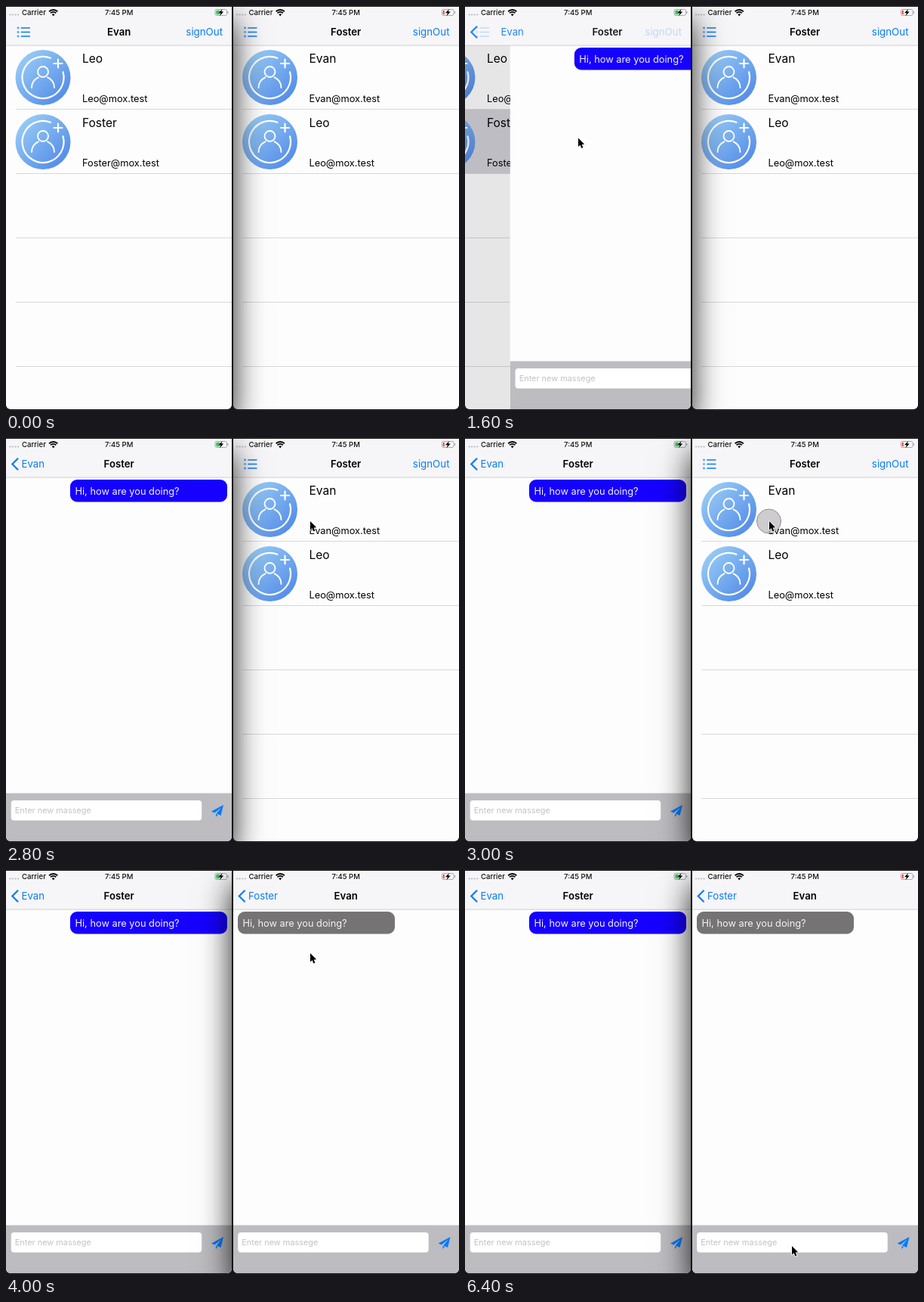
An HTML page with a canvas that plays this animation: 600 px wide and 534 px high, repeating every 8000 ms.

```html
<!DOCTYPE html>
<html lang="en">
<head>
<meta charset="utf-8">
<title>Chat on two phones</title>
<style>
html, body { margin: 0; width: 100%; height: 100%; overflow: hidden; background: #111; }
canvas { display: block; width: 600px; height: 534px; }
</style>
</head>
<body>
<canvas id="stage"></canvas>
<script>
const W = 600, H = 534, LOOP = 8000, STEP = 200;
const BLUE = '#087bfb', PAGE = '#fefdfe', NAV = '#f6f5f7', LINE = '#d8d7da';
const canvas = document.getElementById('stage');
const ctx = canvas.getContext('2d');
const dpr = window.devicePixelRatio || 1;
canvas.width = W * dpr;
canvas.height = H * dpr;

const phones = [
  { x: 0, left: 0, right: 299, me: 'Evan', peer: 'Foster', contacts: ['Leo', 'Foster'],
    picked: 1, pushAt: 1460, bubbleX: 85, bubble: '#1600fe', fill: '#35c759', level: 5 },
  { x: 300.5, left: 301, right: 600, me: 'Foster', peer: 'Evan', contacts: ['Evan', 'Leo'],
    picked: 0, pushAt: 3000, bubbleX: 6.5, bubble: '#757374', fill: '#ff3b30', level: 2 }
];
const FOCUS_SWITCH = 3000;
const taps = [1400, 3000];

// Pointer paths as [time, x, y]; the pointer is hidden between paths.
const paths = [
  [[200, 240, 528], [600, 205, 400], [1000, 156, 200], [1400, 150, 175], [1800, 150, 174],
   [2000, 150, 174], [2400, 320, 122], [2800, 403, 110], [5200, 403, 110]],
  [[5800, 252, 398], [6000, 345, 468], [6200, 425, 505], [6400, 433, 497], [8000, 433, 497]]
];

function text(str, x, y, size, color, weight = 400, align = 'left') {
  ctx.font = `${weight} ${size}px Inter, "Open Sans", sans-serif`;
  ctx.fillStyle = color;
  ctx.textAlign = align;
  ctx.fillText(str, x, y);
}

function box(x, y, w, h, r, color) {
  ctx.beginPath();
  ctx.roundRect(x, y, w, h, r);
  ctx.fillStyle = color;
  ctx.fill();
}

function trace(points, close) {
  ctx.beginPath();
  points.forEach(([x, y]) => ctx.lineTo(x, y));
  if (close) ctx.closePath();
}

function poly(points, color) {
  trace(points, true);
  ctx.fillStyle = color;
  ctx.fill();
}

function stroke(color, width) {
  ctx.strokeStyle = color;
  ctx.lineWidth = width;
  ctx.stroke();
}

function arc(x, y, r, from = 0, to = 360) {
  ctx.beginPath();
  ctx.arc(x, y, r, from * Math.PI / 180, to * Math.PI / 180);
}

function group(draw) {
  ctx.save();
  draw();
  ctx.restore();
}

function statusBar(p) {
  for (let i = 0; i < 4; i++) box(4.5 + i * 3.5, 10.5, 2.2, 2, 1, '#b9b8bb');
  text('Carrier', 21, 12.3, 9.6, '#111', 500);
  text('7:45 PM', 149.7, 12.3, 9.5, '#111', 500, 'center');
  for (const r of [8, 5.2]) {
    arc(62.7, 13, r, 225, 315);
    stroke('#000', 1.8);
  }
  ctx.beginPath();
  ctx.moveTo(62.7, 13.4);
  ctx.arc(62.7, 13, 2.7, Math.PI * 1.25, Math.PI * 1.75);
  ctx.fillStyle = '#000';
  ctx.fill();

  ctx.beginPath();
  ctx.roundRect(277, 4.5, 15.5, 8, 2);
  stroke('#a3a3a5', 0.9);
  box(278.3, 5.8, p.level, 5.4, 1, p.fill);
  box(293.3, 7, 1.2, 3, 0.6, '#a3a3a5');
  poly([[286.6, 4], [281.5, 9.2], [284.4, 9.2], [283, 13.2], [288.2, 7.6], [285.3, 7.6]], '#000');
}

function listNav(p, alpha, withTitle) {
  group(() => {
    ctx.globalAlpha = alpha;
    for (const y of [29, 34.5, 40]) {
      arc(16, y, 1);
      stroke(BLUE, 0.9);
      box(19.7, y - 0.65, 12.3, 1.3, 0.5, BLUE);
    }
    text('signOut', 287, 39, 13.3, BLUE, 400, 'right');
    if (withTitle) text(p.me, 149.7, 39, 13.2, '#000', 600, 'center');
  });
}

function chatNav(p, offset) {
  const lag = Math.max(0, offset - 6);
  group(() => {
    ctx.globalAlpha = 1 - Math.max(0, offset - 30) / 270;
    ctx.lineCap = 'square';
    trace([[15.3, 27.5], [8.3, 34.5], [15.3, 41.5]]);
    stroke(BLUE, 2.2);
    text(p.me, 20.5 + lag * 0.5, 39, 13.2, BLUE);
    text(p.peer, 149.7 + lag * 0.72, 39, 13.2, '#000', 600, 'center');
  });
}

function avatar(x, y) {
  const sky = ctx.createLinearGradient(x - 26, y - 26, x + 26, y + 26);
  sky.addColorStop(0, '#95c9f5');
  sky.addColorStop(1, '#568ee8');
  arc(x, y, 36.5);
  ctx.fillStyle = sky;
  ctx.fill();
  ctx.lineCap = 'round';
  arc(x, y, 27.5, -15, 291);
  stroke('#fff', 2.2);
  arc(x, y - 7.5, 7, 0, 360);
  stroke('#fff', 1.9);
  arc(x, y + 13.5, 15, 180, 246);
  stroke('#fff', 1.9);
  arc(x, y + 13.5, 15, 294, 360);
  stroke('#fff', 1.9);
  trace([[x + 14.5, y - 18.5], [x + 25.5, y - 18.5]]);
  stroke('#fff', 2.2);
  trace([[x + 20, y - 24], [x + 20, y - 13]]);
  stroke('#fff', 2.2);
}

function list(p, selected) {
  box(0, 52, 300, 482, 0, PAGE);
  if (selected) box(0, 52 + p.picked * 85, 300, 85, 0, '#d1d0d6');
  for (let i = 0; i < 5; i++) box(12.8, 136 + i * 85, 288, 1, 0, LINE);
  p.contacts.forEach((name, i) => {
    const y = i * 85;
    avatar(49, 94.5 + y);
    text(name, 101, 74.8 + y, 15.5, '#000');
    text(name + '@mox.test', 101, 127 + y, 12.8, '#000');
  });
}

function sendIcon(x, y) {
  poly([[x + 16, y], [x, y + 8.6], [x + 4.4, y + 10.5], [x + 13, y + 3.4],
        [x + 6.6, y + 11.4], [x + 12.6, y + 14]], BLUE);
  poly([[x + 6, y + 12], [x + 6, y + 16], [x + 8.5, y + 13]], BLUE);
}

function chat(p) {
  box(0, 52, 300, 482, 0, PAGE);
  box(p.bubbleX, 55, 208, 29.5, 9, p.bubble);
  text('Hi, how are you doing?', p.bubbleX + 6.5, 74.6, 12.8, '#f4f3f8');
  box(0, 469.5, 300, 65, 0, '#bdbcc0');
  box(6.7, 479, 252.5, 26.5, 4, '#fff');
  text('Enter new massege', 11.8, 496.3, 10.9, '#c3c2c6');
  sendIcon(272, 485);
}

// Distance of the chat page from its resting place, 300 while it is still away.
function pageOffset(p, t) {
  const off = 300 * Math.pow(10, -(t - p.pushAt) / 200);
  return off < 1 ? 0 : Math.min(off, 300);
}

function phone(p, t) {
  const off = pageOffset(p, t);
  const pushed = off < 300;
  group(() => {
    ctx.beginPath();
    ctx.roundRect(p.left, 1, p.right - p.left, 532, [0, 0, 6, 6]);
    ctx.clip();
    ctx.translate(p.x, 0);
    if (off > 0) {
      group(() => {
        ctx.translate(pushed ? -0.3 * (300 - off) : 0, 0);
        list(p, pushed);
      });
    }
    if (pushed) {
      box(0, 52, off, 482, 0, `rgba(0,0,0,${0.1 * (1 - off / 300) + 0.01})`);
      group(() => {
        ctx.translate(off, 0);
        chat(p);
      });
    }
    box(0, 0, 300, 52, 0, NAV);
    box(0, 51.7, 300, 0.9, 0, '#c4c3c6');
    if (off > 0) listNav(p, pushed ? off / 270 : 1, !pushed);
    if (pushed) chatNav(p, off);
    statusBar(p);
  });
}

// The focused window casts its shadow on the other one.
function windowShadow(front, back) {
  group(() => {
    ctx.beginPath();
    ctx.roundRect(back.left, 1, back.right - back.left, 532, [0, 0, 6, 6]);
    ctx.clip();
    ctx.shadowColor = 'rgba(0,0,0,0.95)';
    ctx.shadowBlur = 40 * dpr;
    ctx.shadowOffsetY = 20 * dpr;
    ctx.fillStyle = '#000';
    ctx.fillRect(front.left, 0, front.right - front.left, H);
  });
}

function pointerAt(t) {
  for (const path of paths) {
    for (let i = 1; i < path.length; i++) {
      const [t0, x0, y0] = path[i - 1], [t1, x1, y1] = path[i];
      if (t >= t0 && t <= t1) {
        const k = (t - t0) / (t1 - t0);
        return [x0 + (x1 - x0) * k, y0 + (y1 - y0) * k];
      }
    }
  }
  return null;
}

function pointer(t) {
  const at = pointerAt(t);
  if (!at) return;
  const [x, y] = at;
  if (taps.includes(t)) {
    arc(x - 0.5, y, 16);
    ctx.fillStyle = 'rgba(190,188,191,0.75)';
    ctx.fill();
    stroke('#858486', 0.9);
  }
  group(() => {
    ctx.translate(x, y);
    ctx.lineJoin = 'round';
    const arrow = [[0, 0], [0, 11.5], [2.6, 9.2], [4.4, 13.4], [6.4, 12.5], [4.7, 8.5], [8.2, 8.3]];
    trace(arrow, true);
    stroke('#fff', 1.6);
    poly(arrow, '#000');
  });
}

function draw(t) {
  ctx.setTransform(dpr, 0, 0, dpr, 0, 0);
  box(0, 0, W, H, 0, '#161616');
  phones.forEach(p => phone(p, t));
  const [a, b] = phones;
  if (t < FOCUS_SWITCH) windowShadow(a, b);
  else windowShadow(b, a);
  pointer(t);
}

const start = performance.now();
function tick() {
  const t = (performance.now() - start) % LOOP;
  draw(Math.floor(t / STEP) * STEP);
  requestAnimationFrame(tick);
}
tick();
</script>
</body>
</html>
```
